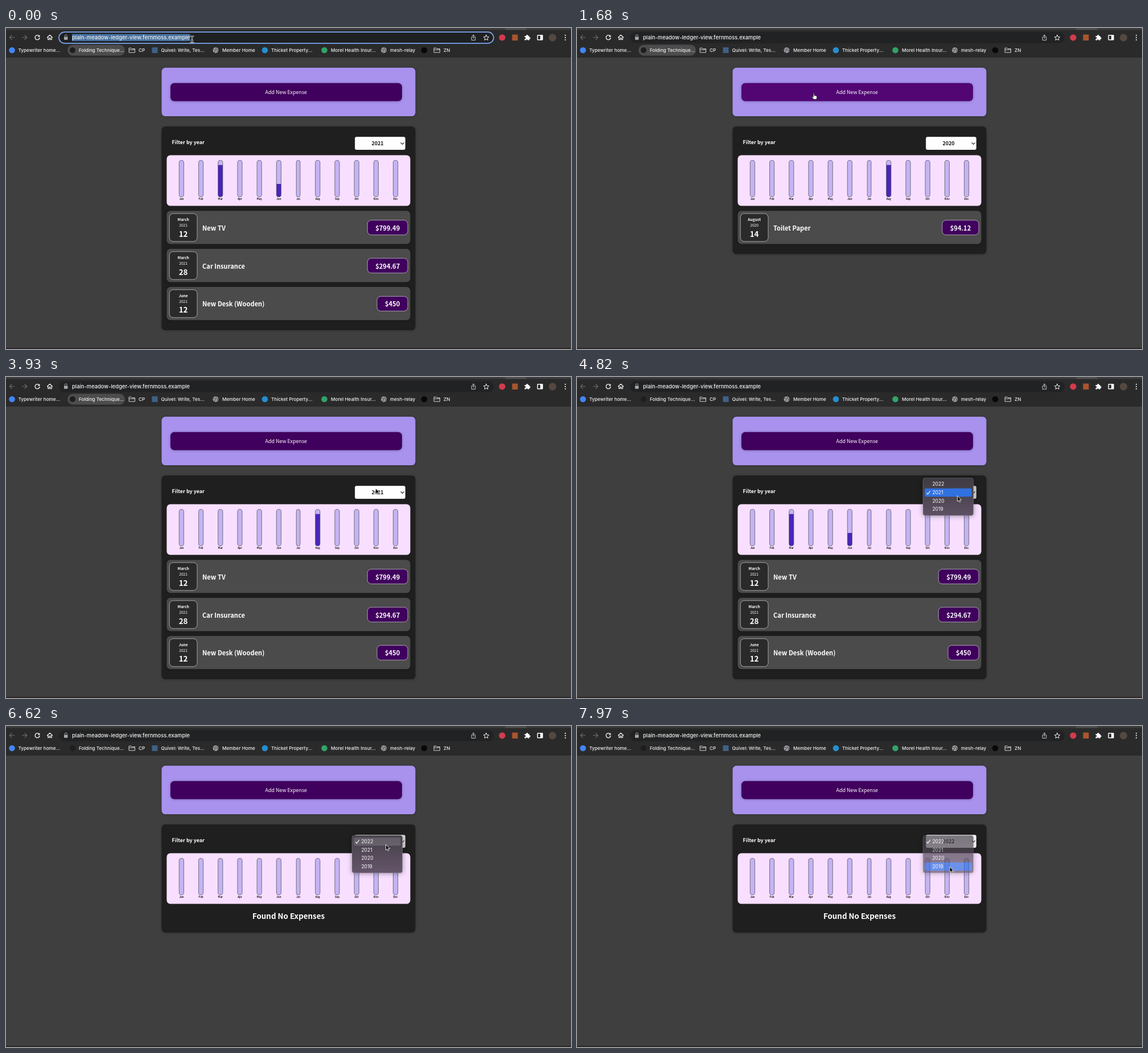
Write an HTML page with a canvas that moves like this. It is 993 px wide and 564 px high and loops after 8000 ms.

```html
<!DOCTYPE html>
<html lang="en">
<head>
<meta charset="utf-8">
<title>Expense tracker</title>
<style>
html, body { margin: 0; width: 100%; height: 100%; overflow: hidden; background: #3f3f3f; }
canvas { display: block; }
</style>
</head>
<body>
<canvas id="stage" width="993" height="564"></canvas>
<script>
const stage = document.getElementById('stage').getContext('2d');
const layer = new OffscreenCanvas(993, 564).getContext('2d');
let g = stage;
const PAGE = '"Noto Sans CJK JP", "Noto Sans JP", "Noto Sans CJK SC", "Noto Sans", sans-serif';
const UI = 'Inter, Roboto, sans-serif';
const REM = 8.92, R = 6.7, ROW = 14.65;
const LEFT = 273.5, MID = 496.5, WIDTH = 446;
const INNER = LEFT + REM, INNER_W = WIDTH - 2 * REM;
const LOOP = 8000;
const MONTHS = 'Jan Feb Mar Apr May Jun Jul Aug Sep Oct Nov Dec'.split(' ');
const YEARS = [2022, 2021, 2020, 2019];
const DATA = {
  2022: { bars: {}, items: [] },
  2021: { bars: { 2: .87, 5: .355 }, items: [
    ['March', 12, 'New TV', '$799.49'],
    ['March', 28, 'Car Insurance', '$294.67'],
    ['June', 12, 'New Desk (Wooden)', '$450']] },
  2020: { bars: { 7: .87 }, items: [['August', 14, 'Toilet Paper', '$94.12']] }
};
// Year switches: time, year, whether the bars animate
const SWITCHES = [[0, 2021, 0], [480, 2020, 0], [3930, 2021, 1], [6020, 2022, 1]];
// Menu: opens, starts to fade, closes, alpha while fading
const MENUS = [[2730, 3780, 3930, .4], [4820, 5870, 6020, .35], [6620, 7970, LOOP, .7]];
// Pointer: time, x, y
const PATH = [[0, 327, 20], [1230, 327, 20], [1530, 388, 86], [1680, 416, 115], [2280, 646, 193.5],
  [3780, 646, 193.5], [4370, 668.5, 209], [4820, 668.5, 209], [5420, 657, 191.5], [5870, 657, 191.5],
  [6470, 667.5, 208.5], [6770, 667.5, 208.5], [7070, 661, 257], [7220, 661, 257], [7820, 655, 247.5], [LOOP, 655, 247.5]];

const clamp = (v, a = 0, b = 1) => Math.min(b, Math.max(a, v));
const ease = p => p * p * (3 - 2 * p);

function stepTime(t) {
  if (t < 330) return 0;
  const start = t < 4370 ? 330 : 4370;
  return start + 150 * Math.floor((t - start) / 150);
}

function box(x, y, w, h, r, fill, stroke, lw = .6) {
  g.beginPath();
  g.roundRect(x, y, w, h, r);
  if (fill) { g.fillStyle = fill; g.fill(); }
  if (stroke) { g.strokeStyle = stroke; g.lineWidth = lw; g.stroke(); }
}

function shadowBox(blur, color, ...args) {
  g.save();
  g.shadowBlur = blur;
  g.shadowColor = color;
  g.shadowOffsetY = .5;
  box(...args);
  g.restore();
}

const dot = (x, y, r, fill) => box(x - r, y - r, 2 * r, 2 * r, r, fill);

// y is the middle of the capitals
function text(s, x, y, size, { weight = 400, color = '#fff', align = 'left', font = PAGE } = {}) {
  g.font = `${weight} ${size}px ${font}`;
  g.fillStyle = color;
  g.textAlign = align;
  g.fillText(s, x, y + size * .365);
}

function path(d, x, y, stroke, lw = 1.2, fill) {
  const p = new Path2D(d);
  g.save();
  g.translate(x, y);
  g.lineCap = g.lineJoin = 'round';
  if (fill) { g.fillStyle = fill; g.fill(p); }
  if (stroke) { g.strokeStyle = stroke; g.lineWidth = lw; g.stroke(p); }
  g.restore();
}

function globe(x, y) {
  dot(x, y, 5, '#9a9da1');
  path('M-4 -1.5 L-1 -1 L0 1 L-2 2 L-2 4 M1 -4 L0 -2 L3 -1 L4 1 L2 2', x, y, '#4a4b4d', 1);
}

const folder = (x, y) =>
  path('M-5 -3.8 H-1.5 L-.3 -2.5 H5 V4 H-5 Z M-5 -.8 H5', x, y, '#d5d5d5', 1);

function toolbar(t) {
  const ink = '#f0f0f0', dim = '#6c6d6f', focus = t < 330;
  box(0, 0, 993, 52, 0, '#2a2a2b');
  box(0, 0, 993, 3.5, 0, '#3c3c3e');
  box(877, 0, 38, 3.5, [4, 4, 0, 0], '#4e4e50');

  path('M4 0 H-4 M-.5 -3.8 L-4.2 0 L-.5 3.8', 10.5, 16.5, dim);
  path('M-4 0 H4 M.5 -3.8 L4.2 0 L.5 3.8', 32.5, 16.5, dim);
  if (t >= 330 && t < 780) path('M-3.5 -3.5 L3.5 3.5 M3.5 -3.5 L-3.5 3.5', 55, 16.5, ink, 1.4);
  else {
    path('M3 -2.6 A4 4 0 1 0 4 1', 55, 16.5, ink, 1.4);
    path('M4.4 -4.6 V-.8 H.6 Z', 55, 16.5, 0, 0, ink);
  }
  path('M-4.5 0 L0 -4.2 L4.5 0 M-3.2 -.8 V4 H-1 V1 H1 V4 H3.2 V-.8', 77, 16.5, ink);

  box(93, 7.2, 764, 19.6, 9.8, focus ? '#1f2022' : '#212223', focus ? '#7ba7ee' : '', 1.7);
  box(102, 15.5, 6.4, 5.2, .8, '#a5a7aa');
  path('M-1.9 0 V-1.8 A1.9 1.9 0 0 1 1.9 -1.8 V0', 105.2, 15.5, '#a5a7aa', 1);
  const url = 'plain-meadow-ledger-view.fernmoss.example';
  g.font = `500 9.4px ${UI}`;
  if (focus) box(116, 10.5, g.measureText(url).width + .5, 12.5, 0, '#48719f');
  text(url, 116, 16.8, 9.4, { weight: 500, color: '#f4f4f4', font: UI });

  path('M-1.5 -1.2 H-3.3 V4.4 H3.3 V-1.2 H1.5 M0 1.2 V-4.8 M-2 -3 L0 -5 L2 -3', 821.5, 17, '#c4c5c7', 1);
  path('M0 -4.8 L1.4 -1.5 L4.8 -1.2 L2.2 1 L3 4.4 L0 2.6 L-3 4.4 L-2.2 1 L-4.8 -1.2 L-1.4 -1.5 Z', 844, 17, ink, 1);
  dot(872, 16.8, 5.6, '#d23b4e');
  box(889.5, 11.5, 10, 10.5, 0, '#a8552c');
  path('M-4.5 -3 H-1.5 A1.5 1.5 0 1 1 1.3 -3 H3.6 V-.6 A1.5 1.5 0 1 1 3.6 2.2 V4.6 H1 A1.4 1.4 0 1 0 -1.8 4.6 H-4.5 V1.8 A1.4 1.4 0 1 0 -4.5 -.8 Z',
    916, 17, 0, 0, '#fff');
  box(934.2, 12.8, 8.8, 8, .5, '', '#fff', 1.4);
  box(939, 12.8, 4, 8, 0, '#fff');
  dot(960.5, 16.8, 6.6, '#55483f');
  for (const dy of [-4, 0, 4]) dot(983, 16.8 + dy, 1.1, ink);
}

function bookmarks(t) {
  const y = 39;
  const pill = t < 4230 ? 1 : t < 4370 ? .5 : 0;
  box(108, 29.5, 101, 19, 9.5, `rgba(76,76,77,${pill})`);
  dot(10.5, y, 5.3, '#4285f4');
  dot(117, y, 5, '#1e1e1f');
  folder(221.5, y);
  box(256.5, 34, 10, 10, 0, '#3f6184');
  globe(368.5, y);
  dot(455, y, 5.3, '#248fd0');
  dot(559.5, y, 5.3, '#32a368');
  globe(664, y);
  dot(735, y, 5.3, '#080808');
  folder(757.5, y);
  const labels = [['Typewriter home...', 21.5], ['Folding Technique...', 128], ['CP', 233], ['Quivel: Write, Tes...', 272.5],
    ['Member Home', 380], ['Thicket Property...', 466], ['Morel Health Insur...', 571], ['mesh-relay', 675], ['ZN', 769]];
  for (const [s, x] of labels) text(s, x, y, 8.2, { weight: 500, color: '#f0f0f0', font: UI });
}

function form(hover) {
  shadowBox(4.5, 'rgba(0,0,0,.25)', LEFT, 69.8, WIDTH, 85.3, R, '#a892ee');
  shadowBox(4, 'rgba(0,0,0,.3)', 289, 96.8, 407, 31.6, R, hover ? '#510674' : '#40005d');
  text('Add New Expense', 492.3, 113, REM, { weight: 500, align: 'center' });
}

function chart(t) {
  const n = SWITCHES.findLastIndex(s => s[0] <= t);
  const [start, year, animated] = SWITCHES[n];
  const now = DATA[year].bars;
  const before = animated ? DATA[SWITCHES[n - 1][1]].bars : now;
  const p = ease(clamp((t - start) / 300));
  box(INNER, 223.4, INNER_W, 89.2, R, '#f8dfff');
  MONTHS.forEach((m, i) => {
    const x = 308.4 + 34.2 * i, w = i === 6 ? 6.8 : 8.2, top = 232.5, h = 64.3;
    const value = (before[i] || 0) * (1 - p) + (now[i] || 0) * p;
    box(x - w / 2, top, w, h, w / 2, '#c3b4f3');
    g.save();
    g.clip();
    box(x - w / 2, top + h * (1 - value), w, h * value, 0, '#4826b9');
    g.restore();
    box(x - w / 2, top, w, h, w / 2, '', '#313131', .6);
    text(m, x, 300.4, REM / 2, { weight: 700, color: '#111', align: 'center' });
  });
}

function expense([month, day, title, price], year, y) {
  const mid = { align: 'center' }, bold = { align: 'center', weight: 700 };
  const right = INNER + INNER_W - REM / 2;
  shadowBox(4.5, 'rgba(0,0,0,.25)', INNER, y, INNER_W, 58.3, R, '#4b4b4b');
  box(287.2, y + 4.8, 48.8, 49, R, '#2a2a2a', '#ececec');
  text(month, 311.6, y + 15.5, REM * .75, bold);
  text(year, 311.6, y + 25.4, REM * .75, mid);
  text(day, 311.6, y + 40.6, REM * 1.5, bold);
  text(title, 345, y + 30.4, REM * 1.25, { weight: 700 });
  g.font = `700 ${REM * 1.25}px ${PAGE}`;
  const w = g.measureText(price).width + REM * 3 + 1;
  box(right - w, y + 16.5, w, 25.8, R, '#40005d', '#ececec');
  text(price, right - w / 2, y + 30.4, REM * 1.25, bold);
}

function expenses(t, year, dimmed) {
  const { items } = DATA[year];
  const h = items.length ? 157.5 + 66.9 * items.length : 190;
  shadowBox(4.5, 'rgba(0,0,0,.25)', LEFT, 172.9, WIDTH, h, R, '#1f1f1f');
  text('Filter by year', 291.5, 201, REM, { weight: 700 });
  box(613.2, 191.3, 88.6, 22.8, 3, dimmed ? '#dcdadd' : '#fff');
  text(year, 653, 203, REM, { weight: 700, color: '#111', align: 'center' });
  path('M-2.7 -1.4 L0 1.4 L2.7 -1.4', 696.6, 203, '#222', 1.1);
  chart(t);
  items.forEach((item, i) => expense(item, year, 321.2 + 66.9 * i));
  if (!items.length) text('Found No Expenses', MID, 334.5, REM * 1.5, { weight: 700, align: 'center' });
}

function menu(t, year, open, tipY) {
  const checked = YEARS.indexOf(year);
  const top = 203 - ROW * checked - 10.8, h = 66;
  const rowY = i => 203 + ROW * (i - checked);
  let active = clamp(Math.round((tipY - rowY(0)) / ROW), 0, 3);
  if (open === 2730 && t < 3330) active = checked;
  const pale = open === 6620 && t < 6770;

  const back = g.createLinearGradient(0, 164, 0, 258);
  back.addColorStop(0, '#38363c');
  back.addColorStop(.45, '#4b4450');
  back.addColorStop(1, '#65556a');
  shadowBox(8, 'rgba(0,0,0,.4)', 608, top, 88.8, h, 4, back);
  box(608, top, 88.8, h, 4, '', 'rgba(255,255,255,.28)', .7);
  box(611, rowY(active) - ROW / 2, 82.6, ROW, 2.8, pale ? 'rgba(255,255,255,.15)' : '#3071e0');
  YEARS.forEach((y, i) => text(y, 624.4, rowY(i), 8.5, { color: '#fff', font: UI }));
  path('M-2.8 .6 L-.9 2.7 L2.9 -2.8', 617.5, 203.3, '#fff', 1.2);
}

// The menu fades as one layer
function showMenu(t, year, [open, fade, , alpha], tipY) {
  layer.clearRect(0, 0, 993, 564);
  g = layer;
  menu(t, year, open, tipY);
  g = stage;
  g.globalAlpha = t >= fade ? alpha : 1;
  g.drawImage(layer.canvas, 0, 0);
  g.globalAlpha = 1;
}

function pointerAt(t) {
  const i = PATH.findLastIndex(k => k[0] <= t);
  const a = PATH[i], b = PATH[i + 1];
  const p = ease((t - a[0]) / (b[0] - a[0]));
  return [a[1] + (b[1] - a[1]) * p, a[2] + (b[2] - a[2]) * p];
}

function pointer(x, y, hand) {
  if (y < 28) {
    const beam = 'M-2.6 -5.5 Q0 -5.5 0 -3.5 Q0 -5.5 2.6 -5.5 M0 -3.5 V3.5 M-2.6 5.5 Q0 5.5 0 3.5 Q0 5.5 2.6 5.5 M-1.3 1.5 H1.3';
    path(beam, x, y, '#eee', 2);
    path(beam, x, y, '#222', .8);
  } else if (hand) {
    path('M-.8 5 V.2 A.9 .9 0 0 1 1 .2 V3.6 Q2 2.9 2.7 3.9 Q3.8 3.4 4.3 4.4 Q5.7 4.1 5.7 5.6 V7.4 Q5.7 8.8 4.6 10.4 H-.2 Q-1 8.8 -3 6.6 Q-3.3 5 -1.7 5.6 L-.8 6.4 Z',
      x, y, '#111', .9, '#fff');
  } else {
    path('M0 0 V9.6 L2.2 7.6 L3.7 11 L5.4 10.3 L3.9 7 H6.8 Z', x, y, '#eee', .9, '#080808');
  }
}

function draw() {
  const t = stepTime(performance.now() % LOOP);
  const year = SWITCHES.findLast(s => s[0] <= t)[1];
  const shown = MENUS.find(m => t >= m[0] && t < m[2]);
  const [x, y] = pointerAt(t);
  const hover = x > 289 && x < 696 && y > 97 && y < 128;

  box(0, 0, 993, 564, 0, '#3f3f3f');
  toolbar(t);
  bookmarks(t);
  form(hover);
  expenses(t, year, shown && t < shown[1]);
  box(0, 562, 993, 2, 0, '#2b2628');
  if (shown) showMenu(t, year, shown, y);
  pointer(x, y, hover);
  requestAnimationFrame(draw);
}
draw();
</script>
</body>
</html>
```
